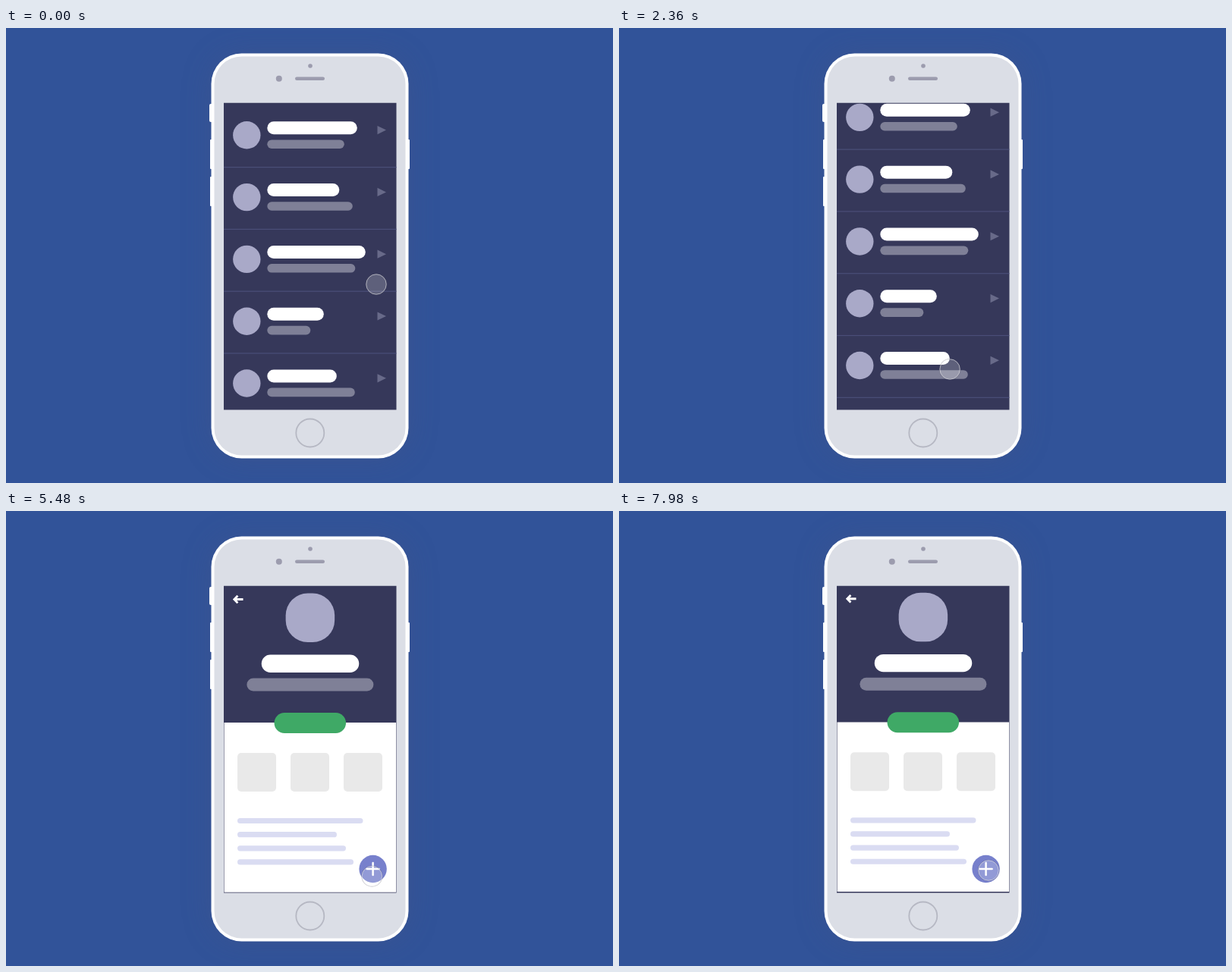
Animation, 800 px wide and 600 px high, one loop 8 s. Source, as an HTML page with a canvas:

```html
<!DOCTYPE html>
<html lang="en">
<head>
<meta charset="utf-8">
<title>Contact list and profile</title>
<style>
  html, body { margin: 0; width: 100%; height: 100%; overflow: hidden; background: #315399; }
  canvas { display: block; width: 800px; height: 600px; }
</style>
</head>
<body>
<canvas id="stage" width="800" height="600"></canvas>
<script>
const ctx = document.getElementById('stage').getContext('2d');
const LOOP = 8000;
const NAVY = '#36385a', LILAC = '#a9a9c8', GREY = '#7f8097', WHITE = '#fff';
const ROW_HEIGHT = 81.8, PICKED = 1;

// Title and subtitle widths of each row
const ROWS = [[118.5, 101.5], [95, 112.5], [129.5, 116], [74.5, 57],
              [91.5, 115.5], [97.5, 82.5], [122.5, 82.5], [79, 100]];

const SCROLL = [[140, 0], [1400, 272], [1560, 272], [2670, 0]];
const CURSOR_X = [[140, 488], [1100, 420], [1540, 416], [1560, 416], [2670, 438],
                  [3280, 418], [4080, 418], [5700, 483], [7280, 484], [7720, 487]];
const CURSOR_Y = [[140, 338], [1100, 200], [1540, 217], [1560, 217], [2670, 472],
                  [3280, 240], [4080, 240], [5700, 484], [6300, 484], [6640, 487],
                  [7280, 480], [7720, 474]];
const MENU = [[5740, 0], [6280, 1], [7340, 1], [7900, 0]];

const clamp = v => Math.min(1, Math.max(0, v));
const mix = (a, b, p) => a + (b - a) * p;
const span = (t, from, to) => clamp((t - from) / (to - from));
const easeOut = (u, power) => 1 - Math.pow(1 - u, power);
const easeInOut = u => u < .5 ? 4 * u ** 3 : 1 - 4 * (1 - u) ** 3;
const backOut = (u, c) => 1 + (c + 1) * (u - 1) ** 3 + c * (u - 1) ** 2;

function track(keys, t) {
  if (t <= keys[0][0]) return keys[0][1];
  for (let i = 1; i < keys.length; i++) {
    const [from, a] = keys[i - 1], [to, b] = keys[i];
    if (t < to) return mix(a, b, easeInOut(span(t, from, to)));
  }
  return keys[keys.length - 1][1];
}

function box(x, y, w, h, r, color) {
  ctx.fillStyle = color;
  ctx.beginPath();
  ctx.roundRect(x, y, w, h, r);
  ctx.fill();
}

const pill = (x, y, w, h, color) => box(x, y - h / 2, w, h, h / 2, color);
const centredPill = (x, y, w, h, color) => pill(x - w / 2, y, w, h, color);

function disc(x, y, r, color) {
  ctx.fillStyle = color;
  ctx.beginPath();
  ctx.arc(x, y, r, 0, Math.PI * 2);
  ctx.fill();
}

function ring(x, y, r, color, width) {
  ctx.strokeStyle = color;
  ctx.lineWidth = width;
  ctx.beginPath();
  ctx.arc(x, y, r, 0, Math.PI * 2);
  ctx.stroke();
}

function stroke(points, color, width) {
  ctx.strokeStyle = color;
  ctx.lineWidth = width;
  ctx.beginPath();
  points.forEach(([x, y], i) => i ? ctx.lineTo(x, y) : ctx.moveTo(x, y));
  ctx.stroke();
}

function drawPhone() {
  ctx.fillStyle = '#315399';
  ctx.fillRect(0, 0, 800, 600);
  ctx.save();
  ctx.shadowColor = 'rgba(80, 85, 125, .3)';
  ctx.shadowBlur = 40;
  box(272, 36, 257, 530, 38, WHITE);
  ctx.restore();
  box(268, 100, 5, 24, 2, WHITE);
  box(269, 147, 4, 39, 1, WHITE);
  box(269, 196, 4, 39, 1, WHITE);
  box(528, 147, 4, 39, 1, WHITE);
  box(270.5, 33.5, 260, 534, 40, WHITE);
  box(274.5, 37.5, 252, 526, 36, '#dbdee6');
  disc(401, 50, 2.8, '#9c9cae');
  disc(359.8, 66.7, 4, '#9c9cae');
  pill(381, 66.7, 39, 4.4, '#9c9cae');
  ring(400.8, 534, 18.5, '#b6b8c3', 1.8);
}

function drawList(scroll, fade, opening) {
  for (let i = 0; i < 10; i++) {
    const y = 141.3 + i * ROW_HEIGHT - scroll;
    const [title, subtitle] = ROWS[i % ROWS.length];
    ctx.globalAlpha = fade;
    ctx.fillStyle = '#4a4e78';
    ctx.fillRect(287, y + 41.7, 228, 1.2);
    ctx.fillStyle = '#686a89';
    ctx.beginPath();
    ctx.moveTo(489.5, y - 12.3);
    ctx.lineTo(501, y - 6.7);
    ctx.lineTo(489.5, y - 1.1);
    ctx.fill();
    if (opening && i === PICKED) continue;
    disc(317.3, y, 18.2, LILAC);
    pill(344.3, y - 9.5, title, 17, WHITE);
    pill(344.3, y + 11.9, subtitle, 11.6, GREY);
  }
  ctx.globalAlpha = 1;
}

function drawBackArrow() {
  ctx.lineJoin = 'miter';
  stroke([[301, 116.5], [312.5, 116.5]], WHITE, 3);
  stroke([[305.4, 111.8], [300.8, 116.5], [305.4, 121.2]], WHITE, 2.8);
}

function drawProfile(u, menu, lift) {
  const near = easeOut(u, 2), settle = easeOut(u, 4);
  const panelTop = mix(503, 279, easeOut(u, 2.36));
  const scale = 1 - .097 * menu;

  ctx.save();
  ctx.translate(400.6, 301 - lift);
  ctx.scale(scale, scale);
  ctx.translate(-400.6, -301);

  ctx.save();
  ctx.beginPath();
  ctx.rect(287.5, panelTop, 226.6, 502.8 - panelTop);
  ctx.clip();
  ctx.fillStyle = u < 1 ? '#f8fafc' : WHITE;
  ctx.fillRect(287, panelTop, 228, 225);
  ctx.globalAlpha = clamp(u * 1.7);
  for (let i = 0; i < 3; i++) box(305 + i * 70, 319, 51, 51, 5, '#e9e9e9');
  [165.5, 131, 143, 153].forEach((w, i) => pill(305, 408.5 + i * 18.15, w, 7.2, '#dadcf2'));
  ctx.restore();

  ctx.globalAlpha = clamp(u * 1.7);
  drawBackArrow();
  centredPill(400.8, mix(285, 279.5, near), 94.5 * near, 27 * near, '#3fa966');
  ctx.globalAlpha = 1;

  centredPill(mix(391.8, 401, settle), mix(213.6, 201.3, settle),
              mix(95, 128.5, u), mix(17, 23.4, u), WHITE);
  centredPill(mix(400.5, 400.9, settle), mix(235, 229, settle),
              mix(112.5, 167, u), mix(11.6, 17, u), GREY);
  const size = mix(36.4, 64.5, backOut(u, 2.8));
  box(mix(317.3, 400.9, near) - size / 2, mix(223.1, 140.8, near) - size / 2,
      size, size, size * mix(.5, .45, clamp(u * 2)), LILAC);
  ctx.restore();
}

function drawMenu(u, menu) {
  const x = mix(534, 483.6, easeOut(u, 3)), y = 472;
  for (const degrees of [80, 135, 190]) {
    const angle = degrees * Math.PI / 180, reach = 38.5 * menu;
    if (menu > 0) {
      disc(x + reach * Math.cos(angle), y - reach * Math.sin(angle), 12.5 * menu, '#a9aefa');
    }
  }
  disc(x, y, 18.2, '#7780cc');
  ctx.save();
  ctx.translate(x, y);
  ctx.rotate(menu * Math.PI / 4);
  ctx.lineCap = 'round';
  stroke([[-8, 0], [8, 0]], WHITE, 2.5);
  stroke([[0, -8], [0, 8]], WHITE, 2.5);
  ctx.restore();
}

function drawCursor(t) {
  const x = track(CURSOR_X, t), y = track(CURSOR_Y, t);
  disc(x, y, 13.5, 'rgba(255, 255, 255, .2)');
  ring(x, y, 13.5, 'rgba(85, 85, 100, .3)', 1.2);
  ring(x, y, 13.2, 'rgba(255, 255, 255, .5)', 1);
}

function render(t) {
  const u = span(t, 3460, 4120);
  const menu = track(MENU, t);
  drawPhone();
  ctx.save();
  ctx.beginPath();
  ctx.rect(287, 98.7, 227.5, 404.8);
  ctx.clip();
  ctx.fillStyle = NAVY;
  ctx.fillRect(287, 98, 228, 406);
  if (u < 1) drawList(track(SCROLL, t), 1 - clamp(u * 2.5), u > 0);
  if (u > 0) {
    drawProfile(u, menu, .7 * span(t, 7340, 7900));
    if (menu > 0) {
      ctx.fillStyle = `rgba(4, 8, 44, ${.735 * menu})`;
      ctx.fillRect(287, 98, 228, 406);
    }
    drawMenu(u, menu);
  }
  drawCursor(t);
  ctx.restore();
}

const start = performance.now();
function frame() {
  render((performance.now() - start) % LOOP);
  requestAnimationFrame(frame);
}
frame();
</script>
</body>
</html>
```
